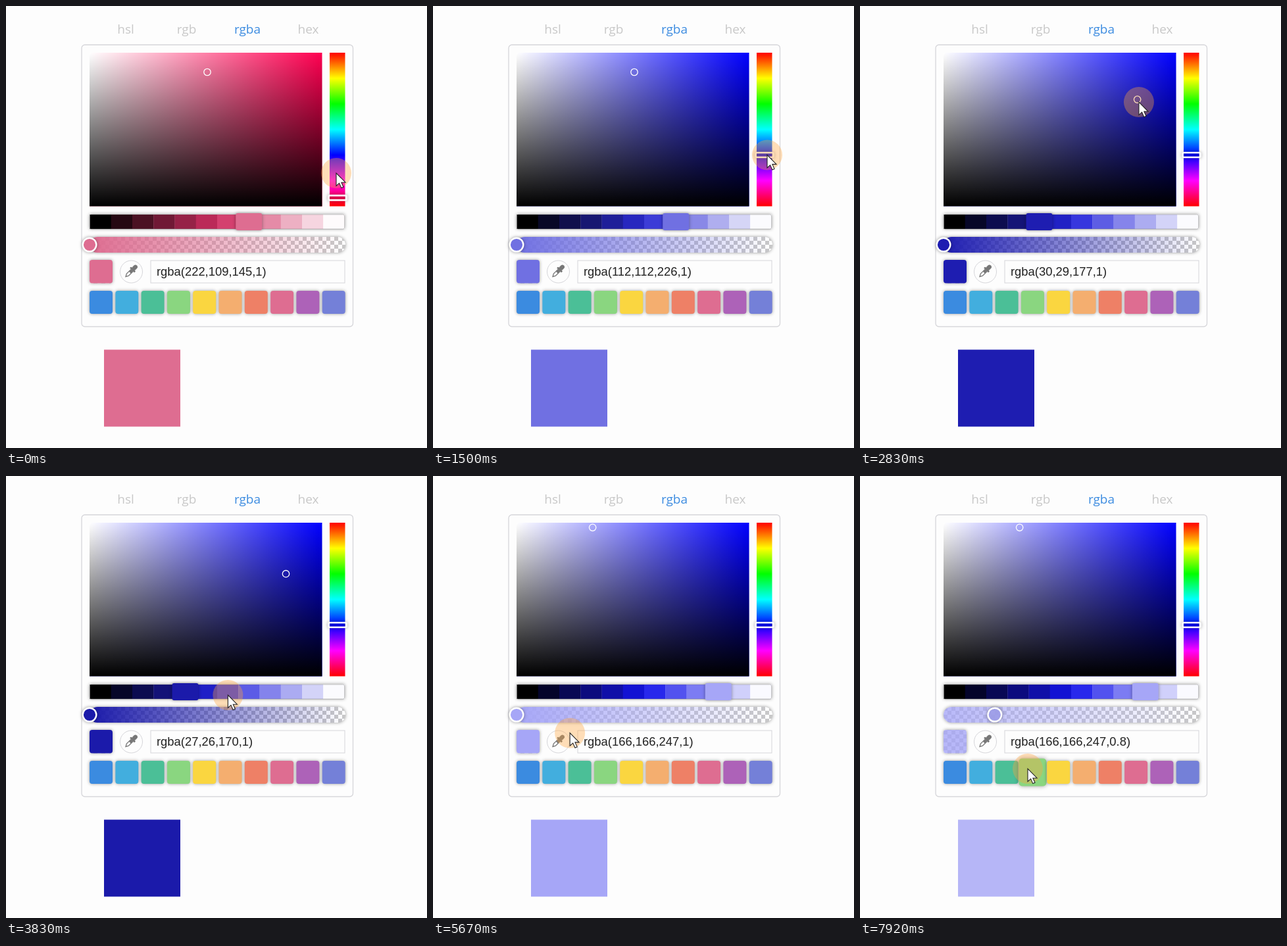
Write an HTML page that moves like this. It is 640 px wide and 672 px high and loops after 8 s.

```html
<!DOCTYPE html>
<html lang="en">
<head>
<meta charset="utf-8">
<title>Colour picker</title>
<style>
  html, body { margin: 0; width: 100%; height: 100%; overflow: hidden; background: #fdfdfd; }
  svg { display: block; }
  .tab { font: 19px "Open Sans", "Noto Sans", sans-serif; text-anchor: middle; fill: #c8c8c8; }
  .active { fill: #3b8be0; }
  .line { fill: none; stroke: #d6d6da; }
  .glow { filter: drop-shadow(0 0 2.5px rgba(0,0,0,.4)); }
  #value { font: 18.4px "Liberation Sans", Arial, sans-serif; fill: #222; }
</style>
</head>
<body>
<svg width="640" height="672" viewBox="0 0 640 672">
  <defs>
    <linearGradient id="whiteFade"><stop stop-color="#fff"/><stop offset="1" stop-color="#fff" stop-opacity="0"/></linearGradient>
    <linearGradient id="blackFade" x2="0" y2="1"><stop stop-opacity="0"/><stop offset="1"/></linearGradient>
    <linearGradient id="rainbow" x2="0" y2="1"></linearGradient>
    <linearGradient id="alphaFade">
      <stop id="alphaStart"/><stop id="alphaEnd" offset="1" stop-opacity="0"/>
    </linearGradient>
    <pattern id="checker" x="127" y="351" width="12" height="12" patternUnits="userSpaceOnUse">
      <path fill="#fff" d="M0 0h12v12H0z"/><path fill="#c8c8c8" d="M0 0h6v6H0zM6 6h6v6H6z"/>
    </pattern>
    <rect id="fieldShape" x="127" y="71" width="353.5" height="233.5"/>
    <rect id="track" x="127" y="351" width="389" height="24" rx="12"/>
  </defs>

  <g id="tabs"></g>
  <rect class="line" x="115" y="59" width="412.5" height="428.5" rx="5" stroke-width="1.3"/>

  <use id="fieldHue" href="#fieldShape"/>
  <use href="#fieldShape" fill="url(#whiteFade)"/>
  <use href="#fieldShape" fill="url(#blackFade)"/>
  <circle id="marker" r="5.2" fill="none" stroke="#fff" stroke-width="1.3"/>

  <rect x="492" y="71" width="23.5" height="233.5" fill="url(#rainbow)"/>
  <rect id="hueKnob" class="glow" x="490.5" y="-3.5" width="27" height="7" rx="2" fill="none" stroke="#fff" stroke-width="2.6"/>

  <rect class="glow" x="127" y="316.5" width="388" height="22.5" rx="2" fill="#fff"/>
  <g id="shades"></g>
  <rect x="127.5" y="317" width="387" height="22" rx="2" fill="none" stroke="#777" stroke-opacity=".4"/>
  <rect id="shadeKnob" class="glow" y="315" width="40" height="26" rx="3"/>

  <use class="glow" href="#track" fill="url(#checker)"/>
  <use href="#track" fill="url(#alphaFade)"/>
  <circle id="alphaKnob" class="glow" cy="363" r="10.3" stroke="#fff" stroke-width="2.4"/>

  <rect class="glow" x="127" y="386" width="35" height="35.5" rx="4" fill="url(#checker)"/>
  <rect id="chip" x="127" y="386" width="35" height="35.5" rx="4"/>
  <circle class="line" cx="190.5" cy="404" r="17"/>
  <g transform="translate(190.5 403) rotate(45)" fill="#777">
    <rect x="-3.2" y="-12" width="6.4" height="9" rx="3.2"/>
    <rect x="-5" y="-4.5" width="10" height="3" rx="1"/>
    <path d="M-2.2-1.5V8L0 12 2.2 8V-1.5" fill="none" stroke="#777" stroke-width="1.3"/>
    <rect x="-2" y="-2" width="4" height="5"/>
  </g>
  <rect class="line" x="220" y="387" width="295" height="34"/>
  <text id="value" x="229" y="409.5"></text>
  <g id="presets"></g>
  <rect id="sample" x="149" y="522.5" width="116" height="117"/>

  <g id="cursor">
    <circle r="23" fill="rgb(255,165,60)" fill-opacity=".36"/>
    <path d="M0 0V19.5L4.6 15.4 7.8 22.6 11 21.2 7.9 14.2H14Z" fill="#fff" stroke="#222" stroke-width="1.1"/>
  </g>
</svg>
<script>
const $ = id => document.getElementById(id);
const set = (el, attrs) => { for (const k in attrs) el.setAttribute(k, attrs[k]); };
const clamp = x => Math.min(1, Math.max(0, x));
const repeat = (id, items, markup) => { $(id).innerHTML = items.map(markup).join(''); return [...$(id).children]; };
const range = n => [...Array(n).keys()];

const LOOP = 8000, FPS = 12, LAG = 100;
const LEFT = 127, TOP = 71, FIELD_W = 353, FIELD_H = 233, TRACK_W = 389;
const SHADE_W = 32.25, SHADE_STEP = .09, SHADE_SAT = .835;

// Stops of the pointer: arrival and departure time, place.
const stops = [
  { at: 0, until: 0, x: 502, y: 254 },
  { at: 250, until: 250, x: 505, y: 291.6 },
  { at: 1000, until: 1000, x: 507, y: 223 },
  { at: 1250, until: 1700, x: 508, y: 226.43 },
  { at: 2050, until: 2250, x: 410.4, y: 123 },
  { at: 2900, until: 3250, x: 425.5, y: 148.7 },
  { at: 3830, until: 3830, x: 337, y: 333 },
  { at: 4650, until: 5000, x: 433, y: 331 },
  { at: 5670, until: 5670, x: 207, y: 391 },
  { at: 6150, until: 6150, x: 127, y: 363 },
  { at: 6600, until: 6600, x: 268.2, y: 365 },
  { at: 7660, until: 7660, x: 204.8, y: 365 },
  { at: 7910, until: LOOP, x: 255, y: 445 }
];
// Press and release times of each drag.
const drags = { hue: [250, 1300], field: [2050, 2950], shade: [4150, 4700], alpha: [6150, 7660] };

function pointerAt(t) {
  const i = stops.findLastIndex(s => s.at <= t);
  const a = stops[i], b = stops[i + 1] || a;
  const u = a === b ? 0 : clamp((t - a.until) / (b.at - a.until));
  return { x: a.x + (b.x - a.x) * u, y: a.y + (b.y - a.y) * u };
}

// The controls trail the pointer a little and keep their last value after release.
function heldAt(name, t) {
  const [press, release] = drags[name];
  return t - LAG >= press ? pointerAt(Math.min(t - LAG, release)) : null;
}

function stateAt(t) {
  const s = { hue: 340.885, sat: .631, light: .649, alpha: 1, marker: { x: 306, y: 100.5 } };
  const hue = heldAt('hue', t), field = heldAt('field', t);
  const shade = heldAt('shade', t), alpha = heldAt('alpha', t);
  if (hue) {
    s.hue = (hue.y - TOP) / FIELD_H * 360;
    s.sat = s.light = .6628;
  }
  if (field) {
    const sv = (field.x - LEFT) / FIELD_W, v = 1 - (field.y - TOP) / FIELD_H;
    s.light = v * (1 - sv / 2);
    s.sat = (v - s.light) / Math.min(s.light, 1 - s.light);
    s.marker = field;
  }
  if (shade) {
    s.sat = SHADE_SAT;
    s.light = Math.floor((shade.x - LEFT) / SHADE_W) * SHADE_STEP;
    const v = s.light + s.sat * Math.min(s.light, 1 - s.light);
    s.marker = { x: LEFT + 2 * (1 - s.light / v) * FIELD_W, y: TOP + (1 - v) * FIELD_H };
  }
  if (alpha) s.alpha = 1 - (alpha.x - LEFT) / TRACK_W;
  return s;
}

function hslToRgb(h, s, l) {
  const a = s * Math.min(l, 1 - l);
  return [0, 8, 4].map(n => {
    const k = (n + h / 30) % 12;
    return Math.round(255 * (l - a * Math.max(-1, Math.min(k - 3, 9 - k, 1))));
  });
}

repeat('tabs', ['hsl', 'rgb', 'rgba', 'hex'], (name, i) =>
  `<text class="tab ${name === 'rgba' ? 'active' : ''}" x="${182 + i * 92.5}" y="42">${name}</text>`);
repeat('rainbow', range(7), i => `<stop offset="${i / 6}" stop-color="hsl(${i * 60},100%,50%)"/>`);
const shades = repeat('shades', range(12), i =>
  `<rect x="${127.5 + i * SHADE_W}" y="317" width="${SHADE_W + .3}" height="22"/>`);
const presetColors = '#3b8be0 #42aede #4bbf97 #8ad680 #fad640 #f4ae6f #ee8066 #de6d91 #ad62b8 #7480d8'.split(' ');
const presets = repeat('presets', presetColors, c =>
  `<rect class="glow" x="-17.5" y="-17.5" width="35" height="35" rx="4" fill="${c}"/>`);

function draw(t) {
  const pointer = pointerAt(t);
  const { hue, sat, light, alpha, marker } = stateAt(t);
  const rgb = hslToRgb(hue, sat, light);
  const color = `rgb(${rgb})`;
  const opacity = Math.round(alpha * 100) / 100;
  const filled = { fill: color, 'fill-opacity': opacity };

  set($('cursor'), { transform: `translate(${pointer.x} ${pointer.y})` });
  set($('fieldHue'), { fill: `hsl(${hue},100%,50%)` });
  set($('marker'), { cx: marker.x, cy: marker.y });
  set($('hueKnob'), { transform: `translate(0 ${TOP + hue / 360 * FIELD_H})` });

  shades.forEach((el, i) => set(el, { fill: `rgb(${hslToRgb(hue, sat, i * SHADE_STEP)})` }));
  set($('shadeKnob'), { x: 123.5 + Math.round(light / SHADE_STEP) * SHADE_W, fill: color });

  set($('alphaStart'), { 'stop-color': color, 'stop-opacity': opacity });
  set($('alphaEnd'), { 'stop-color': color });
  set($('alphaKnob'), { cx: LEFT + (1 - alpha) * TRACK_W, ...filled });
  set($('chip'), filled);
  set($('sample'), filled);
  $('value').textContent = `rgba(${rgb},${opacity})`;

  presets.forEach((el, i) => {
    const x = 144.5 + i * 39.3, y = 450.5;
    const hover = Math.max(Math.abs(pointer.x - x), Math.abs(pointer.y - y)) < 17.5;
    set(el, { transform: `translate(${x} ${y}) scale(${hover ? 1.2 : 1})` });
  });
}

const start = performance.now();
function tick() {
  const t = (performance.now() - start) % LOOP;
  draw(Math.floor((t + 5) * FPS / 1000) * 1000 / FPS);
  requestAnimationFrame(tick);
}
tick();
</script>
</body>
</html>
```
